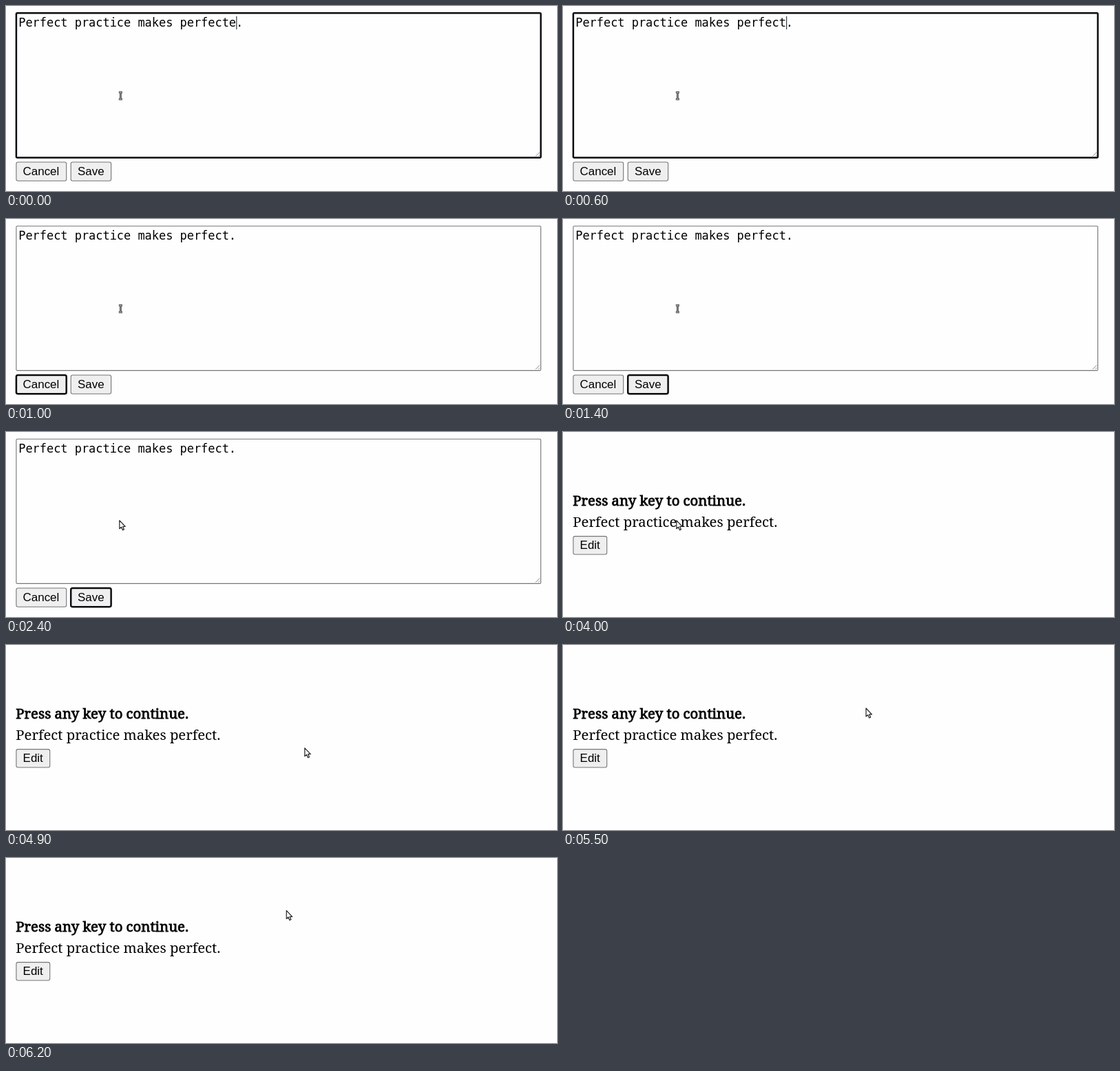
An HTML page for the animation above (8000 ms loop, 800 by 269 pixels).

```html
<!DOCTYPE html>
<html lang="en">
<head>
<meta charset="utf-8">
<title>Edit and save</title>
<style>
  html, body { margin: 0; width: 100%; height: 100%; overflow: hidden; background: #fffefe; }
  svg { display: block; width: 800px; height: 269px; }
  .mono { font: 16.93px "DejaVu Sans Mono", monospace; }
  .button text { font: 16.93px "Liberation Sans", Arial, sans-serif; }
  .serif { font: 20.31px "Roboto Slab", "Noto Serif", serif; }
  .title { stroke: #000; stroke-width: 0.8; }
  .box { fill: #fffefe; stroke: #767676; stroke-width: 1.1; }
  .button .box { fill: #efefef; }
  .focus .box { stroke: #0c0c10; stroke-width: 2.5; }
  .arrow { fill: #fff; stroke: #222; stroke-width: 1.2; stroke-linejoin: round; }
</style>
</head>
<body>
<svg viewBox="0 0 800 269">
  <g id="editor">
    <g id="area">
      <rect class="box" x="14.9" y="10.2" width="761.6" height="210.2" rx="1.5"/>
      <path d="M769 218.5l6-6M773 218.5l2-2" stroke="#777" stroke-width="0.9"/>
    </g>
    <text id="typed" class="mono" x="18.2" y="30"></text>
    <rect id="caret" y="15" width="1.2" height="19" fill="#333a48"/>
    <g id="cancel" class="button">
      <rect class="box" x="14.9" y="227" width="72.8" height="27.2" rx="2.5"/>
      <text x="24.6" y="246">Cancel</text>
    </g>
    <g id="save" class="button">
      <rect class="box" x="94.2" y="227" width="58.4" height="27.2" rx="2.5"/>
      <text x="104" y="246">Save</text>
    </g>
  </g>
  <g id="view">
    <text class="serif title" x="14.3" y="107">Press any key to continue.</text>
    <text class="serif" x="14.3" y="137.5">Perfect practice makes perfect.</text>
    <g class="button">
      <rect class="box" x="14.9" y="151.6" width="48.8" height="26.4" rx="2.5"/>
      <text x="24.6" y="170">Edit</text>
    </g>
  </g>
  <g id="beam" fill="none">
    <path d="M163.8 125.5H169M163.8 135.5H169M166.4 125.5V135.5" stroke="#2a2a2a" stroke-width="2.6"/>
    <path d="M163.8 125.5H169M163.8 135.5H169M166.4 125.5V135.5" stroke="#ddd" stroke-width="0.7"/>
  </g>
  <path id="arrow" class="arrow" d="M0 0V12L2.7 9.6L4.6 14L6.6 13.1L4.8 8.9H8.4Z"/>
</svg>
<script>
const LOOP = 8000, CHAR = 10.192;
const $ = id => document.getElementById(id);
const show = (id, on) => $(id).style.display = on ? "" : "none";

// Each step: start time, then its value
const words = [[0, "perfecte"], [200, "perfec"], [600, "perfect"]];
const focus = [[0, "area"], [1000, "cancel"], [1300, "save"]];
const pointer = [[0, [164.8, 128.6]], [4900, [433.8, 149.8]], [5100, [456, 132]],
  [5200, [469.8, 113]], [5500, [440, 92]], [5600, [407.2, 76.4]]];
const at = (steps, t) => steps.filter(s => s[0] <= t).pop()[1];

function draw(now) {
  const t = now % LOOP;
  const line = "Perfect practice makes " + at(words, t);
  const active = at(focus, t);
  $("typed").textContent = line + ".";
  $("caret").setAttribute("x", 18.2 + line.length * CHAR);
  show("caret", active === "area");
  for (const id of ["area", "cancel", "save"]) $(id).classList.toggle("focus", id === active);
  show("editor", t < 3400);
  show("view", t >= 3400);
  show("beam", t < 2300);
  show("arrow", t >= 2300);
  $("arrow").setAttribute("transform", `translate(${at(pointer, t)})`);
  requestAnimationFrame(() => draw(performance.now()));
}
draw(performance.now());
</script>
</body>
</html>
```
